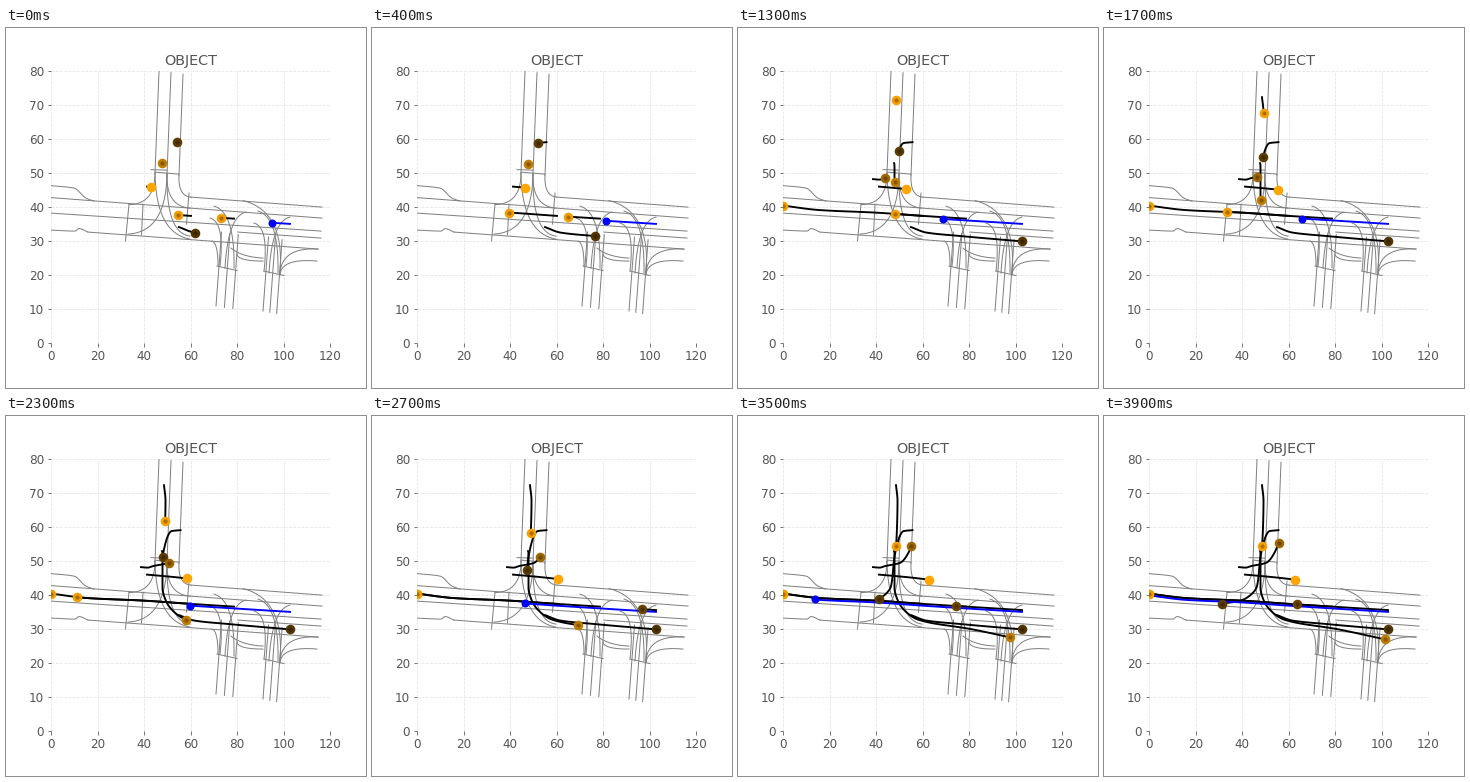
Write a matplotlib script that moves like this. It is 360x360 px and loops after 4000 ms.

```python
import numpy as np
import matplotlib.pyplot as plt
from matplotlib.animation import FuncAnimation

FRAMES, INTERVAL = 40, 100
plt.rcParams["font.family"] = "DejaVu Sans"
INK = "#555555"


def to_data(x, y):
    """Stage pixels to axis units."""
    return (np.asarray(x) - 45) / 2.325, (315 - np.asarray(y)) / 3.4


def hermite(t, knots, values):
    """Smooth interpolation that never overshoots its knots."""
    knots, values = np.array(knots, float), np.array(values, float)
    h = np.diff(knots)
    d = np.diff(values) / h
    prod = d[:-1] * d[1:]
    total = np.where(prod > 0, d[:-1] + d[1:], 1)
    inner = np.where(prod > 0, 2 * prod / total, 0)
    m = np.concatenate([d[:1], inner, d[-1:]])
    t = np.clip(t, knots[0], knots[-1])
    i = np.clip(np.searchsorted(knots, t, side="right") - 1, 0, len(h) - 1)
    s = (t - knots[i]) / h[i]
    return ((1 + 2 * s) * (1 - s) ** 2 * values[i]
            + s * (1 - s) ** 2 * h[i] * m[i]
            + s * s * (3 - 2 * s) * values[i + 1]
            + s * s * (s - 1) * h[i] * m[i + 1])


fig = plt.figure(figsize=(5, 5), dpi=72, facecolor="white")
ax = fig.add_axes([.125, .125, .775, .755])
ax.set(xlim=(0, 120), ylim=(0, 80), xticks=range(0, 121, 20),
       yticks=range(0, 81, 10))
ax.set_title("OBJECT", fontsize=14.4, color=INK, pad=6)
ax.tick_params(labelsize=12, length=3.5, width=.8, pad=3.5,
               color=INK, labelcolor=INK)
ax.grid(color="#e5e5e5", linestyle="--", linewidth=.8)
ax.set_axisbelow(True)
for spine in ax.spines.values():
    spine.set_visible(False)


def road(x, y):
    ax.plot(*to_data(x, y), color="grey", lw=1, zorder=2)


def line(x0, y0, x1, y1):
    road([x0, x1], [y0, y1])


def turn(x0, y0, cx, cy, x1, y1):
    """Quadratic bend around a corner point."""
    s = np.linspace(0, 1, 30)
    a, b, c = (1 - s) ** 2, 2 * s * (1 - s), s * s
    road(a * x0 + b * cx + c * x1, a * y0 + b * cy + c * y1)


def verge(xs, ys):
    x = np.linspace(xs[0], xs[-1], 60)
    road(x, hermite(x, xs, ys))


def south_road(x, y, gap, dx, dy):
    """Three lanes with a stop bar, and the bends that lead into them."""
    for i in range(3):
        bx, by = x + gap * i, y + 1.3 * i
        line(bx, by, bx + 5.5, by - 74)
    line(x + 1, y - 40, x + 21, y - 35.5)
    for bend in [(208, 178, 229, 184, 228, 240), (240, 184, 222, 188, 219, 240),
                 (204, 190, 219, 194, 214, 238)]:
        turn(*(v + (dy if k % 2 else dx) for k, v in enumerate(bend)))


# main road
line(45, 169.5, 316, 190)
line(45, 185, 315, 203)
line(82, 204, 312, 221)
line(232, 204, 315, 210)
line(185, 169, 316, 179)
verge([45, 68, 80, 88], [157.5, 160, 170, 173])
verge([45, 69, 73, 82], [202, 203, 200.5, 204])

# north road and its junction
for k in range(3):
    top = 153 + 12 * k
    line(top, 43 + 1.5 * k, top - 4, 145 + k)
line(145, 141.5, 161, 142)
line(149, 144, 173, 146)
line(123, 176, 119.5, 213)
line(137, 176, 135.5, 207)
line(183, 165, 180.5, 196)
turn(149, 145, 149, 176, 123, 176.5)
turn(173, 147, 172, 168, 185, 169)
turn(149, 145, 150, 205, 184, 211)
turn(161, 146, 160, 204, 122, 206)
turn(161, 146, 160, 178, 184, 180)
turn(161, 146, 160, 205, 184, 208)

# south roads
south_road(210, 278, 8.4, 0, 0)
south_road(257, 283, 6.8, 44, 5)
turn(237, 172.5, 279, 183, 274, 245)
turn(206, 213, 212, 215, 212, 238)
turn(225, 220, 236, 229, 257, 230)
turn(231, 226, 232, 233, 257, 233)
turn(274, 245, 276, 219, 312, 221)
turn(274, 247, 275, 230, 311, 233)


def west(x):
    """Height of the westbound lane."""
    return hermite(x, [45, 82, 137, 185, 284], [177.5, 182, 184.5, 187.8, 194])


def orange(level):
    return (level, .647 * level, 0)


class User:
    """A dot with its trail; the one without a shade is blue."""

    def __init__(self, shade, steps, xs, ys=None):
        self.steps, self.xs, self.ys = steps, xs, ys
        blue = shade is None
        self.shift = 1.8 if blue else 0
        self.trail, = ax.plot([], [], color="blue" if blue else "black",
                              lw=1.9, zorder=4 if blue else 3)
        self.dots = [self.dot("blue" if blue else orange(shade),
                              8 if blue else 9.6)]
        if not blue and shade < 1:
            self.dots.append(self.dot(orange(shade * .7), 4.2))

    def dot(self, color, size):
        return ax.plot([], [], "o", color=color, ms=size, mew=0, zorder=5)[0]

    def at(self, t):
        x = hermite(t, self.steps, self.xs)
        y = hermite(t, self.steps, self.ys) if self.ys else west(x)
        return to_data(x, y + self.shift)

    def show(self, step):
        shown = step >= self.steps[0]
        for artist in (self.trail, *self.dots):
            artist.set_visible(shown)
        if shown:
            end = min(step, self.steps[-1])
            x, y = self.at(np.linspace(self.steps[0], end, 120))
            self.trail.set_data(x, y)
            for dot in self.dots:
                dot.set_data(x[-1:], y[-1:])


users = [
    # along the westbound lane
    User(None, [-2.5, 0, 4, 9, 23, 31, 39],
         [284, 265.5, 234, 214, 184, 112, 42]),
    User(.95, [-1.5, 4, 9, 13], [185, 137, 82.5, 45]),
    User(.95, [-2.5, 4, 9, 17, 26], [228, 196, 183, 122.5, 45]),
    User(.42, [25, 31, 39], [284, 243.5, 192.5]),
    # eastbound, then north to west and north to east
    User(.32, [-1.8, 0, 4, 10], [173, 188.5, 223, 283.5],
         [199, 204.5, 208, 213.3]),
    User(.36, [-2, 4, 9, 23, 31, 36, 39],
         [174.5, 165.5, 162.5, 156.5, 153, 137, 117.5],
         [114, 115, 118.5, 140.5, 170, 184.5, 187.5]),
    User(.75, [0, 4, 9, 17, 19.5, 23, 31, 36],
         [156, 156.3, 156.5, 156.5, 161, 180, 235.5, 281],
         [135, 135.6, 141.5, 172, 187, 203.5, 213.5, 223.3]),
    # around the north junction
    User(1, [-2, 4, 17, 31], [141, 152.5, 173.5, 190.5],
         [158.5, 159.5, 161.5, 163.5]),
    User(.62, [5, 9, 13, 23, 31, 39],
         [135, 141.5, 147, 162.5, 171.5, 174.5],
         [151, 151.5, 150, 146.5, 134.5, 126.5]),
    User(.97, [12, 17, 31, 35], [158, 159.5, 158.3, 157.5],
         [69, 84.5, 125.5, 129.5]),
]


def draw(step):
    for user in users:
        user.show(step)
    return []


anim = FuncAnimation(fig, draw, frames=FRAMES, interval=INTERVAL,
                     repeat=True, repeat_delay=0, blit=False)
plt.show()
```
